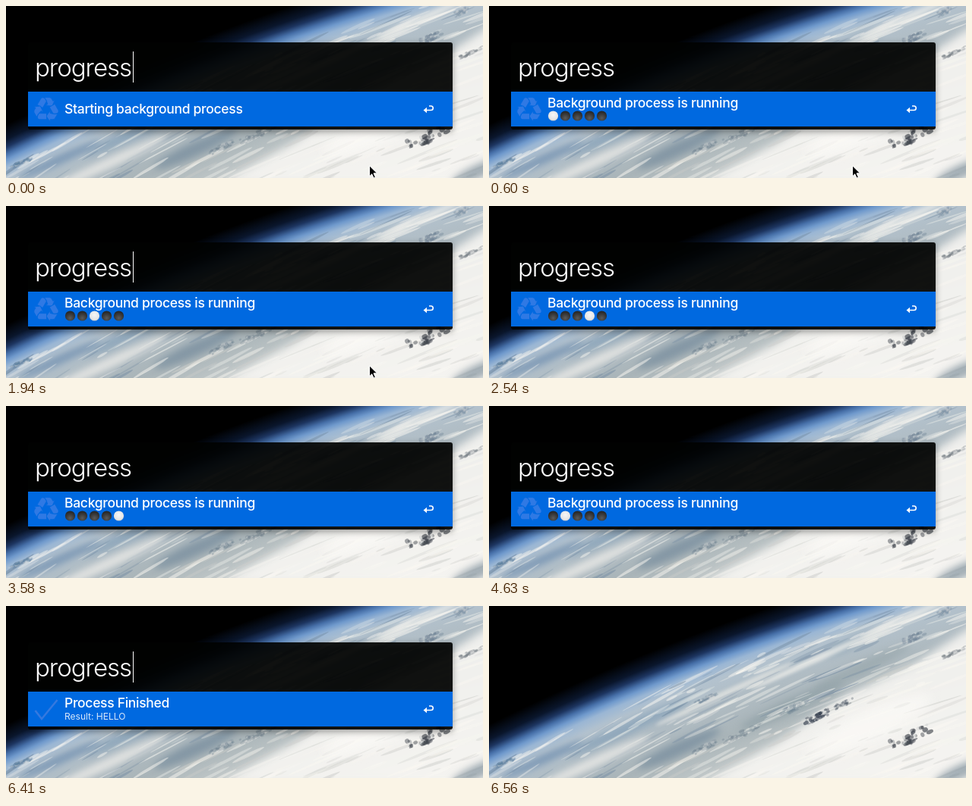
Recreate the animation shown at these times as an HTML page with a canvas. Size 628 by 227 pixels, loop 6.66 s.

```html
<!DOCTYPE html>
<html lang="en">
<head>
<meta charset="utf-8">
<title>Background progress</title>
<style>
  html, body { margin: 0; width: 100%; height: 100%; overflow: hidden; background: #000; }
  canvas, svg { position: absolute; left: 0; top: 0; width: 628px; height: 227px; }
  text { font-family: Inter, "Open Sans", sans-serif; fill: #fff; }
  #panel { filter: drop-shadow(0 3px 4px rgba(0, 0, 0, .4)); }
</style>
</head>
<body>
<canvas id="sky" width="628" height="227"></canvas>
<svg viewBox="0 0 628 227">
  <defs>
    <radialGradient id="dark" cx=".5" cy=".72" r=".65">
      <stop offset="0" stop-color="#5a5a5a"/>
      <stop offset=".55" stop-color="#3c3c3c"/>
      <stop offset="1" stop-color="#262626"/>
    </radialGradient>
    <radialGradient id="light" cx=".5" cy=".4" r=".65">
      <stop offset="0" stop-color="#f6f6f6"/>
      <stop offset=".7" stop-color="#e6e6e6"/>
      <stop offset="1" stop-color="#c4c4c4"/>
    </radialGradient>
    <g id="arrow">
      <path d="M-12.5-6.5L-7.5-15Q-6.5-16.5-4.5-16.5Q-2.2-16-1.2-14L.3-11.3L-5-2.2z"/>
      <path d="M-2.5-16.7H4.5Q6.5-16.5 7.5-14.8L9.3-11.7L12-13.3L8.2-4.6L-1.2-5.6L1.8-7.3L.2-12.5z"/>
    </g>
  </defs>
  <g id="window">
    <g id="panel">
      <rect x="29" y="48" width="559" height="115" rx="3" fill="#020302" fill-opacity=".905"/>
    </g>
    <rect x="29" y="113" width="559" height="46" fill="#0069e0"/>
    <text x="38" y="92.5" font-size="33" font-weight="350" letter-spacing="-1">progress</text>
    <rect id="caret" x="167" y="60" width="1" height="41" fill="#fff"/>
    <g id="recycle" transform="translate(53 136.5) scale(.95)" fill="#2f79e4" stroke="#0069e0" stroke-width=".8">
      <use href="#arrow"/>
      <use href="#arrow" transform="rotate(120)"/>
      <use href="#arrow" transform="rotate(240)"/>
    </g>
    <path id="check" d="M38.5 138L47 149L67.5 124" fill="none" stroke="#3579df" stroke-width="2.6"/>
    <text id="title" x="77" font-size="17.5" font-weight="500" letter-spacing="-.3"></text>
    <text id="result" x="77" y="150" font-size="12" fill-opacity=".85">Result: HELLO</text>
    <g id="dots"></g>
    <path d="M552 137.5H559.5a2.75 2.75 0 0 0 0-5.5H557" fill="none" stroke="#fff" stroke-width="1.6"/>
    <path d="M549.5 137.5L554 133.7V141.3z" fill="#fff"/>
  </g>
  <path id="pointer" d="M478.5 210.8v14l3.2-3 2.4 5.2 2.3-1-2.4-5.2h4.5z" fill="#000" stroke="#fff"/>
</svg>
<script>
const LOOP = 6660;
const el = id => document.getElementById(id);
const show = (id, on) => { el(id).style.visibility = on ? 'inherit' : 'hidden'; };

function paintSky() {
  const ctx = el('sky').getContext('2d');
  const cx = 1361, cy = 2887, limb = 3001;   // planet circle

  // Atmosphere and ground tone by height above the limb
  const glow = ctx.createRadialGradient(cx, cy, limb - 221, cx, cy, limb + 79);
  const tones = [[-221, '#e6e7e3'], [-150, '#ccd1d0'], [-90, '#a9b4b8'], [-50, '#b0bcc3'],
    [-15, '#b3c2ce'], [0, '#9ab6d4'], [8, '#6f99cc'], [15, '#466fa8'], [23, '#1d3560'],
    [32, '#0a162c'], [50, '#000']];
  for (const [height, color] of tones) glow.addColorStop((height + 221) / 300, color);
  ctx.fillStyle = glow;
  ctx.fillRect(0, 0, 628, 227);

  let seed = 7;
  const random = () => (seed = (seed * 16807) % 2147483647) / 2147483647;
  const blob = (x, y, rx, ry, color, alpha, blur, tilt = -.43) => {
    ctx.filter = `blur(${blur}px)`;
    ctx.globalAlpha = alpha;
    ctx.fillStyle = color;
    ctx.beginPath();
    ctx.ellipse(x, y, rx, ry, tilt, 0, 7);
    ctx.fill();
  };

  ctx.save();
  ctx.beginPath();
  ctx.arc(cx, cy, limb + 2, 0, 7);
  ctx.clip();

  // Open water between the clouds, then the bright cloud deck
  blob(70, 203, 60, 6, '#5f83a8', .6, 4);
  blob(185, 160, 90, 8, '#6f90ae', .5, 5);
  blob(250, 188, 60, 9, '#71879a', .65, 5);
  blob(400, 130, 75, 9, '#8799a0', .55, 5);
  blob(490, 82, 70, 8, '#95a4a8', .6, 5);
  blob(480, 48, 40, 6, '#7893aa', .5, 4);
  ctx.filter = 'blur(6px)';
  ctx.globalAlpha = .92;
  ctx.fillStyle = '#f6f5f1';
  ctx.fill(new Path2D('M650 18L560 76L470 117L380 180L280 235H650z'));

  // Wispy streaks following the curve of the planet
  for (let i = 0; i < 420; i++) {
    const x = random() * 640;
    const depth = 3 + random() ** 1.3 * 240;
    const y = cy - Math.sqrt((limb - depth) ** 2 - (cx - x) ** 2);
    const white = random() < .62;
    const tilt = -Math.asin((cx - x) / limb) - .04 - random() * .1;
    const onDeck = y > 310 - .43 * x;
    const color = white ? '#faf8f2' : onDeck ? '#cccdca' : '#7088a0';
    blob(x, y, 6 + random() * 38, .6 + random() * 1.8, color, .2 + random() * .35, .6, tilt);
  }

  // Broad white bands and the grey far corner
  blob(130, 210, 90, 7, '#efeeea', .75, 4);
  blob(440, 66, 105, 4, '#f6f4ee', .7, 2);
  blob(545, 18, 60, 5, '#f6f4ee', .7, 3);
  blob(310, 116, 100, 4, '#f2f0ea', .6, 2);
  blob(500, 158, 90, 20, '#fdfcf8', .6, 8);
  blob(622, 218, 40, 9, '#7f909c', .7, 5);

  // Storm clouds: dark and lit puffs scattered along a slope
  const storm = (x, y, w, h, color, alpha) => {
    for (let i = 0; i < 45; i++) {
      const along = random() + random() - 1;
      const across = random() - .5;
      const lit = random() < .25;
      blob(x + along * w * .5, y - along * w * .22 + across * h * .7,
        1.5 + random() * w * .06, 1 + random() * h * .1,
        lit ? '#d4d6d6' : color, alpha * (.4 + random() * .5), .5);
    }
  };
  storm(555, 173, 62, 24, '#41464e', .8);
  storm(430, 147, 40, 13, '#3c4554', .8);
  storm(467, 129, 28, 9, '#5c6672', .6);
  storm(400, 135, 46, 12, '#718595', .45);
  storm(556, 43, 36, 12, '#6d8194', .55);
  storm(611, 62, 34, 7, '#777f86', .55);
  storm(599, 8, 24, 10, '#7f93a6', .55);
  storm(285, 122, 34, 7, '#758b9e', .5);
  storm(335, 168, 60, 12, '#71828f', .45);
  storm(285, 186, 40, 10, '#6b7e8d', .45);
  storm(20, 207, 34, 8, '#5b7f9f', .5);
  ctx.restore();
}

const caretToggles = [150, 740, 1340, 1940, 2390, 2990, 3580, 4180, 4630, 5220, 5820, 6410];
const dotSteps = [600, 1190, 1940, 2540, 3290, 3880, 4630];
const passed = (times, t) => times.filter(time => t >= time).length;

const dots = Array.from({ length: 5 }, (_, i) => {
  const dot = document.createElementNS('http://www.w3.org/2000/svg', 'circle');
  dot.setAttribute('cx', 84.5 + 16 * i);
  dot.setAttribute('cy', 145);
  dot.setAttribute('r', 6.6);
  return el('dots').appendChild(dot);
});

function render(t) {
  const running = t >= 600 && t < 5220;
  const finished = t >= 5220;
  const active = (passed(dotSteps, t) + 4) % 5;

  show('window', t < 6560);
  show('caret', passed(caretToggles, t) % 2 === 0);
  show('recycle', !finished);
  show('check', finished);
  show('result', finished);
  show('dots', running);
  dots.forEach((dot, i) => dot.setAttribute('fill', i === active ? 'url(#light)' : 'url(#dark)'));

  el('title').textContent = finished ? 'Process Finished'
    : running ? 'Background process is running' : 'Starting background process';
  el('title').setAttribute('y', running || finished ? 134 : 142);
  el('pointer').style.opacity = t < 2240 ? 1 : t < 2390 ? .4 : 0;
}

paintSky();
const start = performance.now();
function tick() {
  render((performance.now() - start) % LOOP);
  requestAnimationFrame(tick);
}
tick();
</script>
</body>
</html>
```
